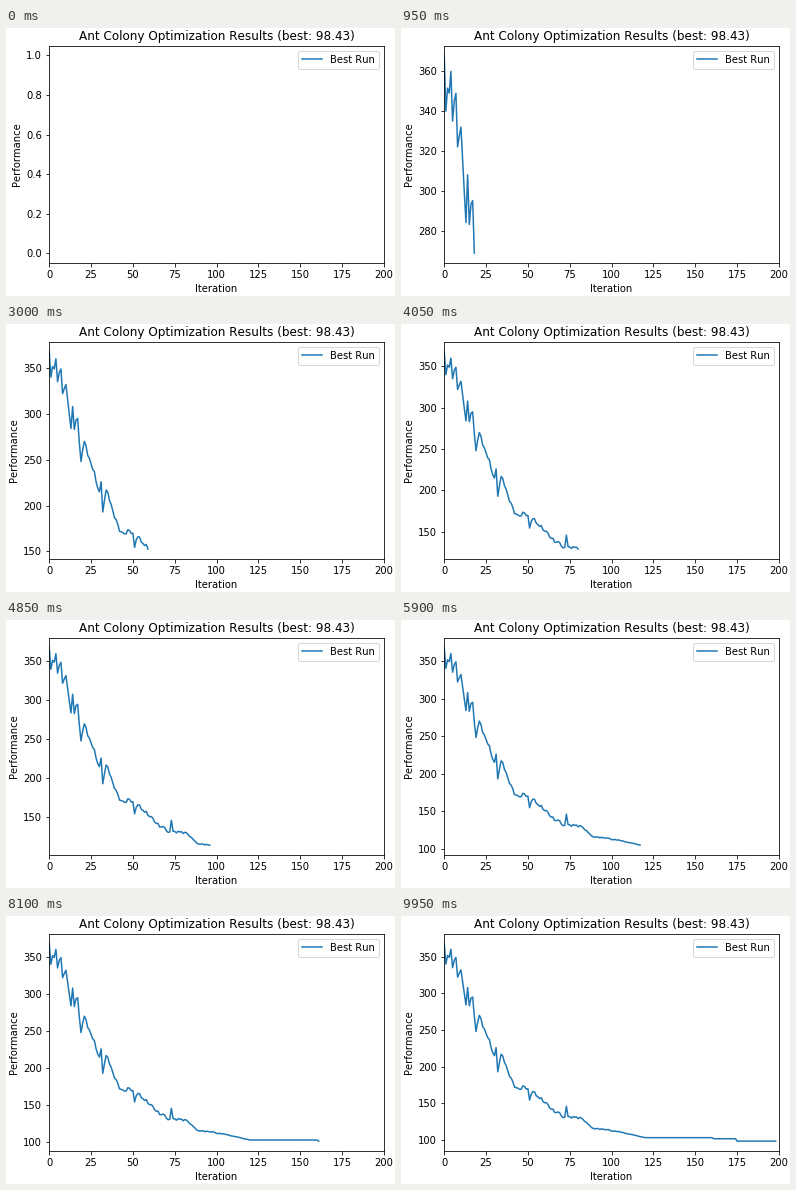
Animation of 389x268 px, one loop 10000 ms. Source, as a matplotlib script:

```python
import matplotlib.pyplot as plt
from matplotlib.animation import FuncAnimation
import numpy as np

W, H, DPI = 389, 268, 72
FRAMES, INTERVAL = 200, 50
BEST = 98.43
NOISY_STEPS = 120

# Main turning points of the run: iteration, performance
turns = [(0, 368), (1, 340), (4, 360), (5, 335), (7, 349), (8, 322),
         (10, 332), (13, 284), (14, 308), (15, 283), (17, 295), (19, 248),
         (21, 270), (30, 215), (31, 226), (32, 193), (34, 217), (42, 172),
         (50, 170), (51, 154.5), (53, 166), (64, 142), (72, 131), (73, 146),
         (74, 132), (82, 130), (88, 117), (105, 111), (NOISY_STEPS, 103.2),
         (160, 103.2), (161, 101.7), (174, 101.7), (175, BEST)]


def make_run():
    x, y = np.transpose(turns)
    steps = np.arange(FRAMES - 1)
    # Jitter fades out as the colony converges; turning points stay put
    spread = 3.5 * np.clip(1 - steps / NOISY_STEPS, 0, 1)
    jitter = spread * np.random.default_rng(4).uniform(-1.5, 1.5, len(steps))
    jitter[x.astype(int)] = 0
    return steps, np.interp(steps, x, y) + jitter


def y_limits(shown):
    if len(shown) == 0:
        lo, hi = 0, 1
    elif len(shown) == 1:
        lo, hi = shown[0] * 0.95, shown[0] * 1.05
    else:
        lo, hi = shown.min(), shown.max()
    pad = 0.05 * (hi - lo)
    return lo - pad, hi + pad


steps, values = make_run()

plt.rcParams["text.kerning_factor"] = 6
fig = plt.figure(figsize=(W / DPI, H / DPI), dpi=DPI, facecolor="white")
ax = fig.add_axes([43.2 / W, 32.975 / H, 334.8 / W, 217.44 / H])
line, = ax.plot([], [], color="#1f77b4", lw=1.5, label="Best Run")
ax.set_xlim(0, 200)
ax.set_xlabel("Iteration")
ax.set_ylabel("Performance")
ax.set_title(f"Ant Colony Optimization Results (best: {BEST})")
ax.legend(loc="upper right")


def update(n):
    line.set_data(steps[:n], values[:n])
    ax.set_ylim(*y_limits(values[:n]))
    return line,


anim = FuncAnimation(fig, update, frames=FRAMES, interval=INTERVAL,
                     repeat=True, repeat_delay=0)
plt.show()
```
